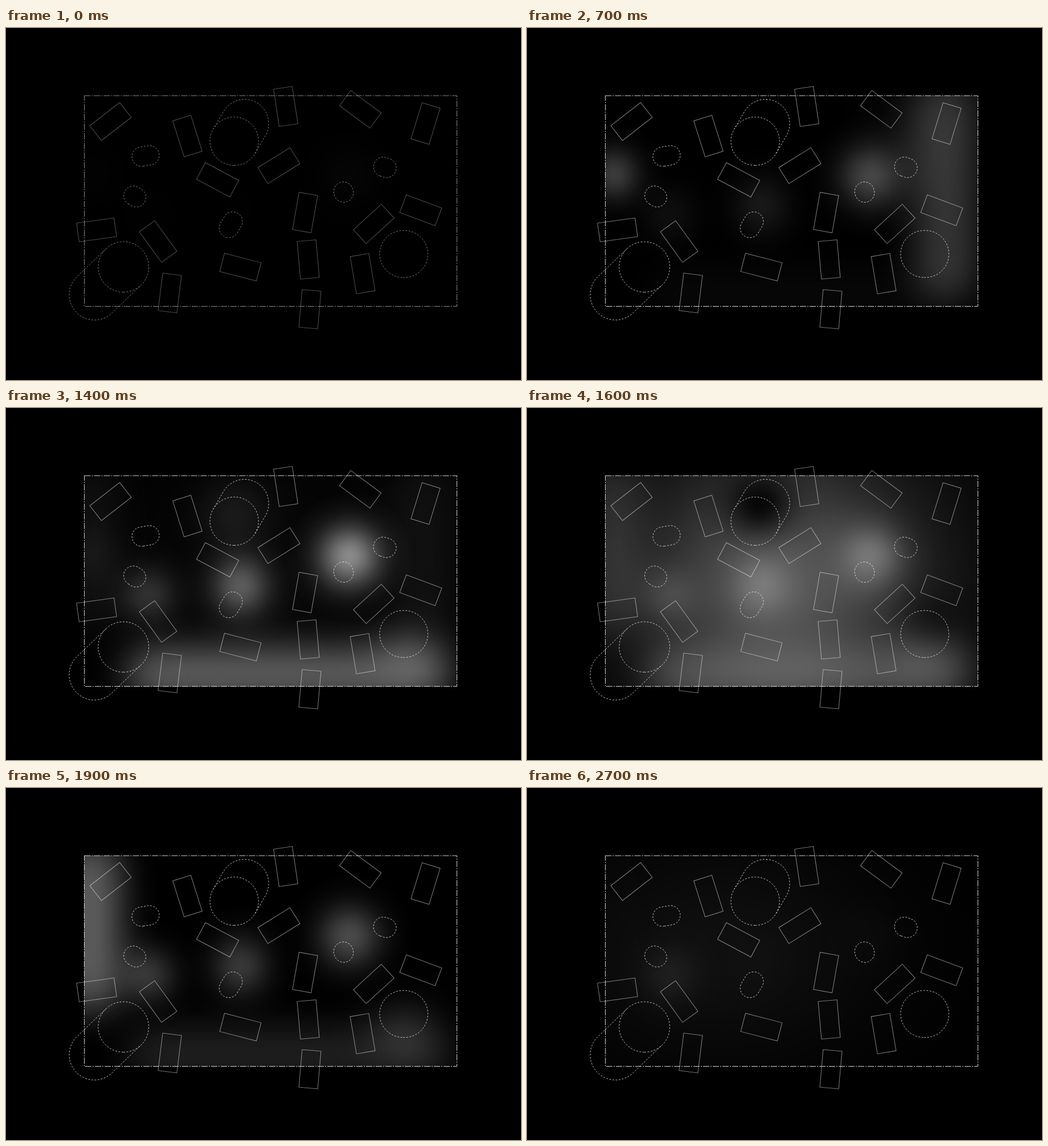
Animation of 904x619 px, one loop 2800 ms. Source, as an HTML page:

```html
<!DOCTYPE html>
<html lang="en">
<head>
<meta charset="utf-8">
<title>Glow plan</title>
<style>
  html, body { margin: 0; width: 100%; height: 100%; overflow: hidden; background: #000; }
  svg { display: block; width: 904px; height: 619px; }
</style>
</head>
<body>
<svg id="stage" viewBox="0 0 904 619">
  <defs id="defs">
    <clipPath id="room"><rect x="137" y="119" width="655" height="371"/></clipPath>
  </defs>
  <g id="glow" clip-path="url(#room)"></g>
  <g id="lines" fill="none" stroke="#fff"></g>
</svg>
<script>
const LOOP = 2800, STEP = 100;
const $ = id => document.getElementById(id);

function add(parent, tag, attrs) {
  const el = document.createElementNS('http://www.w3.org/2000/svg', tag);
  for (const k in attrs) el.setAttribute(k, attrs[k]);
  return parent.appendChild(el);
}

// Gaussian falloff out to three sigma
function falloff(id, color) {
  const g = add($('defs'), 'radialGradient', { id });
  for (let i = 0; i <= 15; i++) {
    const r = i / 15;
    add(g, 'stop', {
      offset: r, 'stop-color': color,
      'stop-opacity': i < 15 ? Math.exp(-4.5 * r * r) : 0
    });
  }
}
falloff('light', '#fff');
falloff('shade', '#000');

// Every lamp swells and fades once: a bell of height peak around time at
const lamps = [];
const pulse = (peak, at, spread) => t => peak * Math.exp(-(((t - at) / spread) ** 2));

function spot(x, y, sx, sy, level, fill = 'light') {
  const el = add($('glow'), 'ellipse', {
    cx: x, cy: y, rx: sx * 3, ry: sy * 3, fill: `url(#${fill})`
  });
  lamps.push({ el, level });
}

function bar(x1, y1, x2, y2, width, blur, level) {
  const id = 'soft' + lamps.length;
  const f = add($('defs'), 'filter', {
    id, filterUnits: 'userSpaceOnUse', x: -100, y: -100, width: 1104, height: 819
  });
  add(f, 'feGaussianBlur', { stdDeviation: blur });
  const el = add($('glow'), 'g', {});
  add(el, 'path', {
    d: `M${x1} ${y1}L${x2} ${y2}`, stroke: '#fff', 'stroke-width': width,
    'stroke-linecap': 'round', filter: `url(#${id})`
  });
  lamps.push({ el, level });
}

// Walls
bar(736, 140, 736, 425, 105, 32, pulse(0.39, 950, 320));
bar(255, 468, 735, 468, 88, 32, pulse(0.39, 1430, 450));
bar(148, 140, 148, 345, 95, 34, pulse(0.41, 1900, 360));

// Single lamps
spot(153, 257, 31, 32, pulse(0.24, 800, 450));
spot(250, 329, 34, 34, pulse(0.21, 1750, 900));
spot(412, 313, 35, 37, pulse(0.35, 1450, 650));
spot(603, 261, 38, 38, pulse(0.55, 1320, 720));
spot(700, 430, 45, 42, pulse(0.18, 1650, 350));
spot(400, 185, 40, 40, pulse(0.09, 1400, 120));
spot(675, 200, 50, 70, pulse(0.07, 900, 350));

// Flash through the whole room, with two dark corners
spot(460, 305, 400, 300, pulse(0.38, 1600, 130), 'shade');
spot(450, 310, 175, 165, pulse(0.35, 1600, 130));
spot(340, 290, 210, 140, pulse(0.06, 2700, 400));
spot(408, 168, 42, 38, pulse(0.9, 1600, 130), 'shade');
spot(715, 370, 42, 36, pulse(0.45, 1600, 130), 'shade');

const outline = (d, dash, opacity) =>
  add($('lines'), 'path', { d, 'stroke-dasharray': dash, 'stroke-opacity': opacity });

outline('M137.5 119H791.5V489.5H137.5Z', '11 2 2 2', 0.82);

// Tables share one size; each has a centre and a tilt
const tables = [
  [183.5, 164.5, -38], [318.5, 190, 72.5], [491, 138, 81.5], [622, 143, 36.5],
  [736.5, 168, 107], [371.5, 267, 28], [479, 242, -32], [525, 324.5, 100],
  [645.5, 344.5, -42.5], [728, 320.5, 20.5], [159, 355, -8], [267, 375.5, 54],
  [287.5, 466, 97], [411.5, 420.5, 14.5], [530.5, 407, 85], [626, 432, 80.5],
  [533.5, 494.5, 95]
];
for (const [x, y, a] of tables) {
  add($('lines'), 'rect', {
    x: -33.2, y: -16.6, width: 66.4, height: 33.2,
    transform: `translate(${x} ${y}) rotate(${a})`, 'stroke-opacity': 0.5
  });
}

// Capsule around two points; an open one leaves out the cap at the first point
function capsule(x1, y1, x2, y2, r, open) {
  const a = Math.atan2(y2 - y1, x2 - x1);
  const nx = -Math.sin(a) * r, ny = Math.cos(a) * r;
  const arc = `A${r} ${r} 0 0 0 `;
  let d = `M${x1 + nx} ${y1 + ny}L${x2 + nx} ${y2 + ny}` +
    `${arc}${x2 - nx} ${y2 - ny}L${x1 - nx} ${y1 - ny}`;
  if (!open) d += `${arc}${x1 + nx} ${y1 + ny}Z`;
  outline(d, '3 2.5', 0.74);
}
const slot = (x, y, dx, dy, r = 17) => capsule(x - dx, y - dy, x + dx, y + dy, r);

// A round stand with the trail it was pulled along
function trail(x, y, dx, dy, r) {
  slot(x, y, 0.1, 0, r);
  capsule(x, y, x + dx, y + dy, r, true);
}

slot(245, 225, 7, -1.2);
slot(226, 296.3, 2.4, 1.5);
slot(592.5, 288.6, 0.3, 0.9);
slot(665, 245, 3, 1);
slot(394.6, 346, 3.4, -5.7);
slot(698.2, 397.4, 1, 0, 41.3);
trail(400.6, 199, 18, -31, 42.5);
trail(206.2, 420.2, -51, 49, 44.3);

function draw(ms) {
  const t = Math.floor((ms % LOOP) / STEP) * STEP;
  for (const { el, level } of lamps) el.setAttribute('opacity', level(t));
  $('lines').setAttribute('opacity', Math.min(1, 0.65 + t / 500));
}

const start = performance.now();
function tick() {
  draw(performance.now() - start);
  requestAnimationFrame(tick);
}
tick();
</script>
</body>
</html>
```
